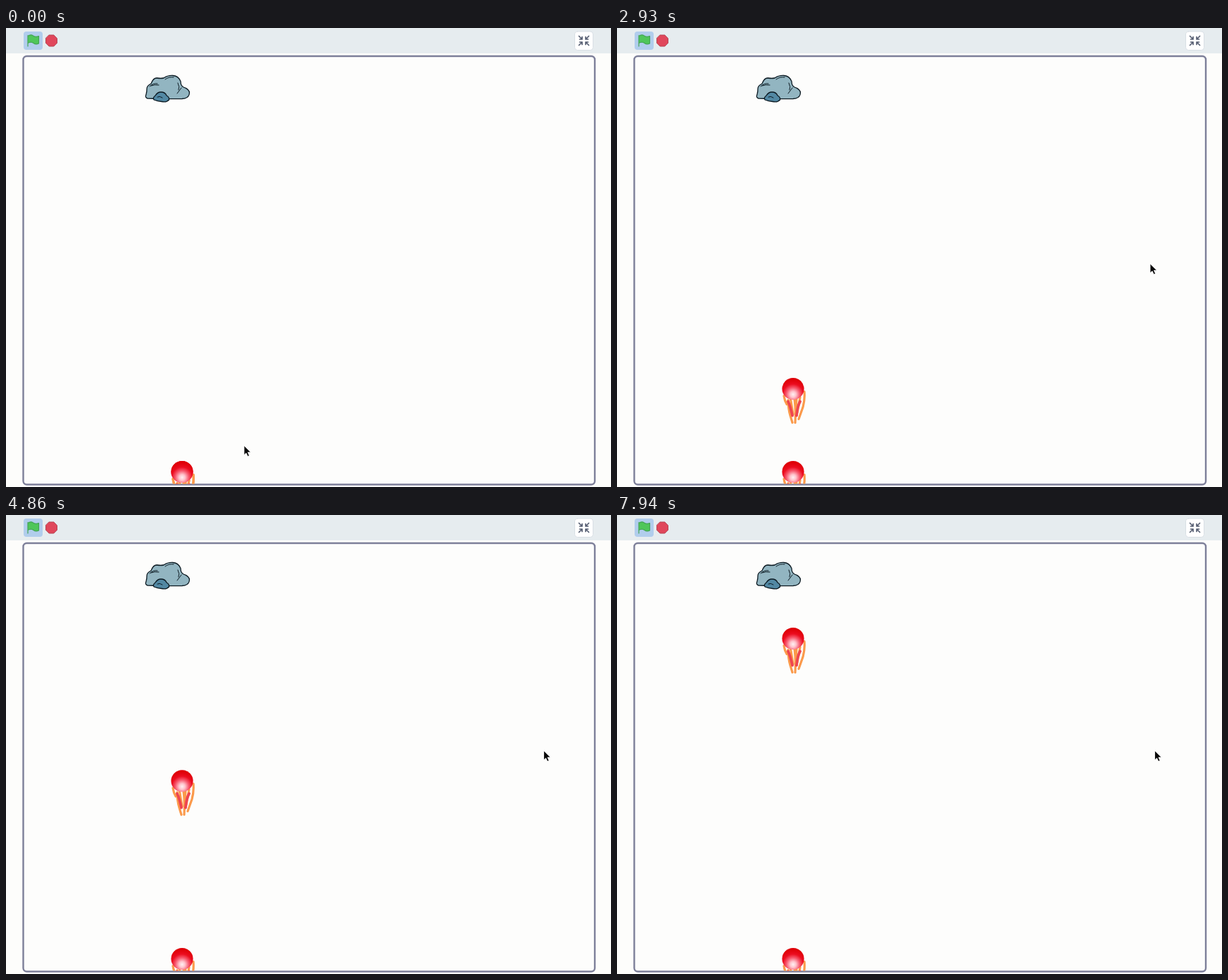
An HTML page that plays this animation: 859 by 652 pixels, repeating every 7990 ms.

```html
<!DOCTYPE html>
<html lang="en">
<head>
<meta charset="utf-8">
<style>
html, body { margin: 0; height: 100%; overflow: hidden; background: #fdfdfb; }
svg { display: block; width: 859px; height: 652px; }
</style>
</head>
<body>
<svg viewBox="0 0 859 652" fill="none" stroke-linecap="round" stroke-linejoin="round">
  <defs>
    <radialGradient id="shine" gradientUnits="userSpaceOnUse" cx="0" cy="8" r="21">
      <stop offset="0" stop-color="#fff0f2"/>
      <stop offset=".2" stop-color="#ffc4cd"/>
      <stop offset=".45" stop-color="#f75b70"/>
      <stop offset=".7" stop-color="#ec0d20"/>
      <stop offset="1" stop-color="#df0008"/>
    </radialGradient>
    <clipPath id="inside"><rect x="25.5" y="41" width="809.5" height="606.5" rx="4"/></clipPath>
    <g id="ball">
      <g stroke="#fb9a4b" stroke-width="3.2">
        <path d="M-13 10Q-12 17-9 22M-7 16Q-7 28-4 38L-1 48M-4 12L0 36M2 14Q4 30 3 48M5 12L4 34M16 4Q17 15 14 26L8 43M10 12L6 34"/>
      </g>
      <path d="M-7 18Q-4 24-1 38M10 18Q6 25 5 38" stroke="#ee4550" stroke-width="3.8"/>
      <circle r="15.6" fill="url(#shine)"/>
    </g>
    <path id="arrow" d="M813.5 11.5l4.5 4.5M818 12.5V16h-3.5"/>
  </defs>

  <rect width="859" height="36" fill="#e6ecef"/>
  <rect x="25" y="5" width="27" height="26" rx="4" fill="#b1cdec"/>
  <path d="M31 11.5Q35 8.5 38.5 11T46.5 11.5V22Q42.5 24 39 21.5T31 21.5M31 10.5V26" fill="#4fc65a" stroke="#43a553" stroke-width="1.2"/>
  <path d="M61.2 10h6.6l4.7 4.7v6.6L67.8 26h-6.6l-4.7-4.7v-6.6z" fill="#e0475b" stroke="#b54554"/>
  <rect x="807.5" y="5" width="26" height="26.5" rx="4" fill="#fff" stroke="#d9dfe5"/>
  <g stroke="#565e72" stroke-width="1.7">
    <use href="#arrow"/>
    <use href="#arrow" transform="matrix(-1 0 0 1 1641 0)"/>
    <use href="#arrow" transform="matrix(1 0 0 -1 0 36)"/>
    <use href="#arrow" transform="matrix(-1 0 0 -1 1641 36)"/>
  </g>

  <rect x="24.5" y="40" width="811.5" height="608.5" rx="5" fill="#fdfdfc" stroke="#7d7f99" stroke-width="2.4"/>

  <g stroke="#0c1a22" stroke-width="1.3">
    <path d="M201 100Q197 99 199 94Q200 91 200 86Q200 82 206 79Q209 71 214 71Q220 72 224 71Q230 67 237 67.5Q245 68 248 76Q248 82 252 84Q260 87 260.5 92Q260 100 250 100.500Q225 101 201 100Z" fill="#92b5c1"/>
    <path d="M204 83Q209 78 215 79M206 82Q211 80 217 81M226 73Q231 69 238 70M244 78Q247 84 245 88M249 85L243 93" stroke-width="1"/>
    <path d="M210 102Q208 99 212 96Q215 91 220 91Q226 91 228 96Q232 98 231.500 102Q228 106 221 104.500Q215 104 210 102Z" fill="#5288a3"/>
    <path d="M215 98Q218 96 222 99" stroke-width="1"/>
  </g>

  <g clip-path="url(#inside)">
    <use id="shot" href="#ball"/>
    <use href="#ball" x="250" y="630.5"/>
  </g>
  <path id="cursor" d="M0 0V13L3 10.300L5.200 15L7.500 14L5.400 9.300H9.300Z" fill="#080808" stroke="#fff" stroke-width=".8"/>
</svg>
<script>
const LOOP = 7990, BASE = 630.5, STEP = 16.85;
const shot = document.getElementById('shot');
const cursor = document.getElementById('cursor');

// [ms, steps climbed]
const climb = [[0, 0], [849, 0.99], [850, 1], [2950, 8], [4390, 14], [7822, 27], [8086, 28]];
// [ms, x, y]
const path = [[0, 338, 593.5], [60, 338, 593.5], [710, 248.5, 624.5], [1150, 248.5, 624.5],
  [2480, 757, 335], [2950, 757, 335], [3250, 763.5, 335]];

const smooth = k => k * k * (3 - 2 * k);

function sample(keys, t, ease = k => k) {
  const i = keys.findIndex(key => key[0] > t);
  if (i < 0) return keys.at(-1).slice(1);
  const a = keys[i - 1], b = keys[i];
  const k = ease((t - a[0]) / (b[0] - a[0]));
  return a.slice(1).map((v, n) => v + (b[n + 1] - v) * k);
}

function move(el, x, y) {
  el.setAttribute('transform', `translate(${x} ${y})`);
}

function draw(now) {
  const t = now % LOOP;
  const steps = Math.floor(sample(climb, t)[0] + 1e-6);
  move(shot, 250, BASE - steps * STEP);
  move(cursor, ...sample(path, t, smooth));
  requestAnimationFrame(draw);
}
draw(0);
</script>
</body>
</html>
```
